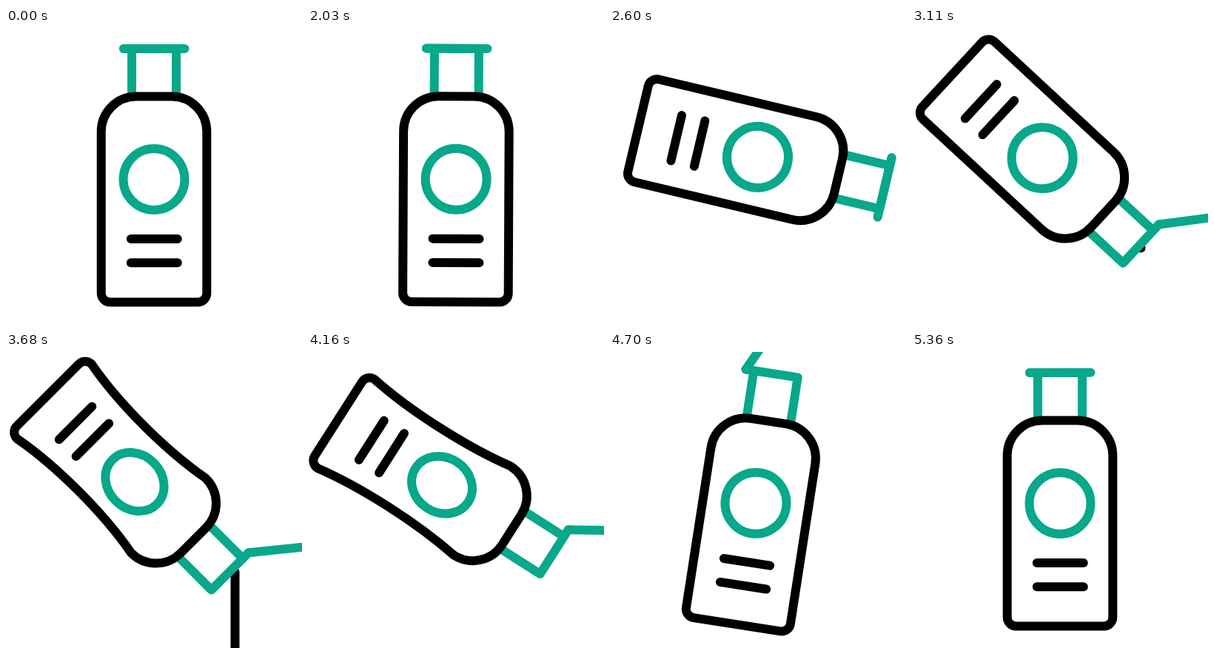
These frames come from a looping animation (400x400 px, 5390 ms). An HTML page:

```html
<!DOCTYPE html>
<html lang="en">
<head>
<meta charset="utf-8">
<title>Bottle</title>
<style>
  html, body { margin: 0; width: 100%; height: 100%; overflow: hidden; background: #fff; }
  svg { display: block; width: 100vw; height: 100vh; }
  path, ellipse { fill: none; stroke: #000; stroke-width: 12; stroke-linecap: round; stroke-linejoin: round; }
  .g { stroke: #08a88a; }
</style>
</head>
<body>
<svg viewBox="0 0 400 400">
  <path id="stream"/>
  <g id="bottle">
    <path class="g" d="M159 28H230V90M170 28V90"/>
    <path class="g" id="lid" d="M159 28H241.5"/>
    <path id="body"/>
    <ellipse class="g" id="ring" cx="200" cy="204.5"/>
    <path d="M168.8 285H231.8M168.8 317.3H231.8"/>
  </g>
</svg>
<script>
const LOOP = 5390, START = 2030, STEP = 30;
const TILT = 135, LID = -141, ARM = 50;
const el = id => document.getElementById(id);
const stream = el('stream'), bottle = el('bottle'), lid = el('lid'), body = el('body'), ring = el('ring');

const clamp = u => Math.min(1, Math.max(0, u));
const span = (t, a, b) => clamp((t - a) / (b - a));
const smooth = (t, a, b) => { const u = span(t, a, b); return u * u * (3 - 2 * u); };
const rad = a => a * Math.PI / 180;

// cubic-bezier(x1, 0, x2, 1)
function ease(u, x1, x2) {
  let lo = 0, hi = 1;
  for (let i = 0; i < 30; i++) {
    const s = (lo + hi) / 2, r = 1 - s;
    if (3 * r * r * s * x1 + 3 * r * s * s * x2 + s * s * s < u) lo = s; else hi = s;
  }
  return lo * lo * (3 - 2 * lo);
}

// Ring centre on the way back: time, x, y
const back = [[4006, 174, 175.5], [4160, 181, 179.7], [4400, 180.7, 193.5], [4700, 197, 204.2], [4850, 200, 204.5]];

function slope(i, k) {
  if (i === 0 || i === back.length - 1) return 0;
  const a = back[i - 1], b = back[i + 1];
  return (b[k] - a[k]) / (b[0] - a[0]);
}

function track(t, k) {
  if (t >= back[back.length - 1][0]) return back[back.length - 1][k];
  let i = 0;
  while (t > back[i + 1][0]) i++;
  const a = back[i], b = back[i + 1], h = b[0] - a[0], u = (t - a[0]) / h;
  const s = u * u * (3 - 2 * u);
  return a[k] + (b[k] - a[k]) * s +
    h * slope(i, k) * u * (1 - u) * (1 - u) - h * slope(i + 1, k) * u * u * (1 - u);
}

function pose(t) {
  if (t >= back[0][0]) {
    return { turn: TILT * (1 - smooth(t, 4006, 4828)), x: track(t, 1), y: track(t, 2) };
  }
  // The grip point moves straight while the bottle turns about it
  const u = span(t, 2000, 3350), p = ease(u, 0.3, 0.065);
  const turn = TILT * ease(u, 0.3, 0.138);
  return {
    turn,
    x: 200 - 61.4 * p + ARM * Math.sin(rad(turn)),
    y: 254.5 - 114.4 * p - ARM * Math.cos(rad(turn))
  };
}

function draw(now) {
  let t = now % LOOP;
  t = t < START ? 0 : START + STEP * Math.floor((t - START) / STEP);

  const { turn, x, y } = pose(t);
  bottle.setAttribute('transform', `translate(${x} ${y}) rotate(${turn}) translate(-200 -204.5)`);

  const open = LID * (smooth(t, 2640, 3130) - ease(span(t, 3757, 5375), 0.333, 0.8));
  lid.setAttribute('transform', `rotate(${open} 159 28)`);

  const q = smooth(t, 3160, 3560) - smooth(t, 4100, 4360), k = 11.8 * q;
  body.setAttribute('d', `M176 92.5H224A47.3 47.3 0 0 1 271.3 140
    C${271.3 - k} 205 ${271.3 - k} 295 271.3 358.5
    A12 12 0 0 1 259.3 370.5H140.7A12 12 0 0 1 128.7 358.5
    C${128.7 + k} 295 ${128.7 + k} 205 128.7 140A47.3 47.3 0 0 1 176 92.5Z`);
  ring.setAttribute('rx', 41.5 - 5 * q);
  ring.setAttribute('ry', 41.5 + q);

  const flow = t >= 3080 && t < 4130;
  const fall = (a, b) => 297 + 115 * span(t, a, b) ** 2;
  stream.setAttribute('d', flow ? `M309.5 ${fall(3750, 4130)}V${fall(3080, 3500)}` : '');
}

let t0;
function tick(now) {
  if (t0 === undefined) t0 = now;
  draw(now - t0);
  requestAnimationFrame(tick);
}
draw(0);
requestAnimationFrame(tick);
</script>
</body>
</html>
```
